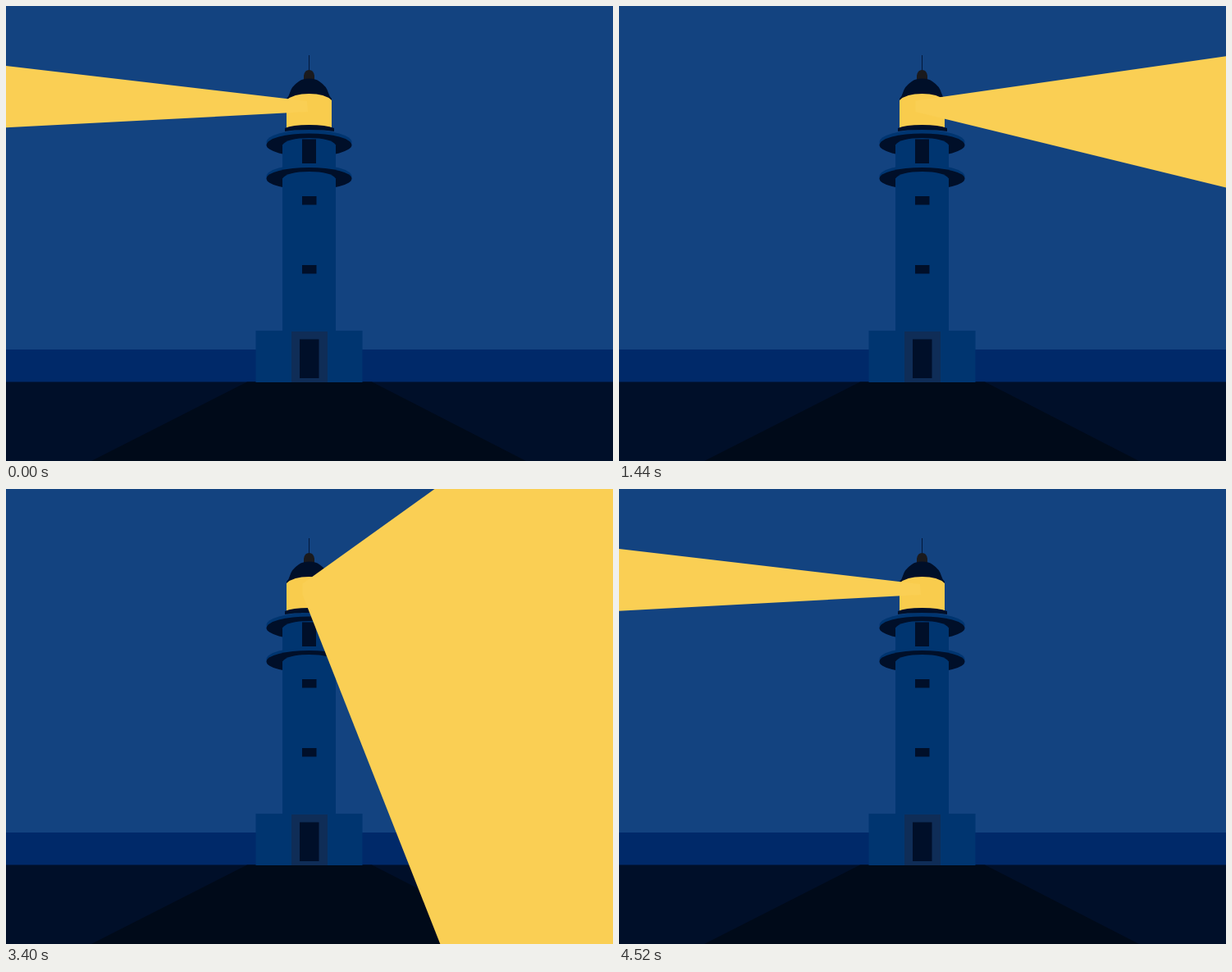
Write an HTML page that moves like this. It is 740 px wide and 555 px high and loops after 4560 ms.

```html
<!DOCTYPE html>
<html lang="en">
<head>
<meta charset="utf-8">
<title>Lighthouse</title>
<style>
  html, body { margin: 0; width: 100%; height: 100%; overflow: hidden; background: #134380; }
  svg { display: block; width: 100vw; height: 100vh; }
  .night { fill: #000f29; }
  .wall { fill: #003570; }
  .light { fill: #facf54; }
</style>
</head>
<body>
<svg viewBox="0 0 740 555">
  <rect width="740" height="555" fill="#134380"/>
  <rect y="419" width="740" height="41" fill="#002969"/>
  <rect y="458.500" width="740" height="97" class="night"/>
  <path d="M294 458.500H446L634 555H104Z" fill="#000a19"/>

  <!-- base -->
  <rect x="304.500" y="396" width="130" height="63" class="wall"/>
  <rect x="348" y="396" width="44" height="63" fill="#0f2d57"/>
  <rect x="358" y="406.500" width="23.500" height="47.500" class="night"/>

  <!-- galleries and tower -->
  <ellipse cx="369.500" cy="166" rx="52" ry="15" class="wall"/>
  <ellipse cx="369.500" cy="169.500" rx="52" ry="14" class="night"/>
  <path d="M337 205V169.500Q343 161 369.500 161T402 169.500V205Z" class="wall"/>
  <rect x="361" y="162.500" width="17" height="29.500" class="night"/>
  <ellipse cx="369.500" cy="207.500" rx="52" ry="14" class="wall"/>
  <ellipse cx="369.500" cy="210.500" rx="52" ry="13.500" class="night"/>
  <path d="M337 397V210.500Q343 202 369.500 202T402 210.500V397Z" class="wall"/>
  <rect x="361" y="232" width="17.500" height="10.500" class="night"/>
  <rect x="361" y="316" width="17.500" height="10.500" class="night"/>

  <!-- lantern -->
  <path d="M369.500 60V80" stroke="#000f29" stroke-width=".8"/>
  <path d="M363 90V85Q364 78 369.500 78T376 85V90Z" fill="#1a1a1d"/>
  <path d="M342 116V113Q345 110 346 106Q348 98 357 92Q361 88.500 369.500 88.500T382 92Q391 98 393 106Q394 110 397 113V116Z" class="night"/>
  <path d="M342 151V115Q350 107 369.500 107T397 115V151Z" fill="#f9cc4d"/>
  <path d="M340 153V149Q349 145 369.500 145T400 149V153Q390 151 369.500 151T340 153Z" class="night"/>

  <path id="beam" class="light"/>
  <rect id="flash" width="740" height="555" class="light"/>
</svg>
<script>
const LOOP = 4560, HALF = LOOP / 2, FRONT = 1040, LEAD = 7;
const FLASH = 100, FAR = 20000;
const beam = document.getElementById('beam');
const flash = document.getElementById('flash');

// Edge directions go from narrow to wide: run shrinks, rise and drop change.
const left = {
  side: -1, top: [367, 116], bottom: [368, 129],
  run: [1, -1], rise: [0.117, 0.085], drop: [0.0526, 0.725]
};
const right = {
  side: 1, top: [361.5, 115.5], bottom: [361.5, 129],
  run: [1, -1.1158], rise: [0.091, -0.0435], drop: [0.0347, 0.1932]
};

const mix = ([a, b], p) => a + b * p;

function beamPath(shape, p) {
  const { side, top, bottom } = shape;
  const dx = side * mix(shape.run, p) * FAR;
  const up = top[1] - mix(shape.rise, p) * FAR;
  const down = bottom[1] + mix(shape.drop, p) * FAR;
  const edge = side * FAR * 2;
  return `M${top}L${top[0] + dx} ${up}L${edge} ${up}` +
    `L${edge} ${down}L${bottom[0] + dx} ${down}L${bottom}Z`;
}

function draw(ms) {
  const t = (ms + LEAD) % LOOP;
  const swing = t < HALF ? t : LOOP - t;
  const onLeft = swing < FRONT;
  const p = onLeft ? (swing / FRONT) ** 2
                   : ((HALF - swing) / (HALF - FRONT)) ** 2;
  beam.setAttribute('d', beamPath(onLeft ? left : right, p));
  flash.setAttribute('opacity', Math.max(0, 1 - Math.abs(swing - FRONT) / FLASH));
}

const start = performance.now();
function tick() {
  draw((performance.now() - start) % LOOP);
  requestAnimationFrame(tick);
}
tick();
</script>
</body>
</html>
```
